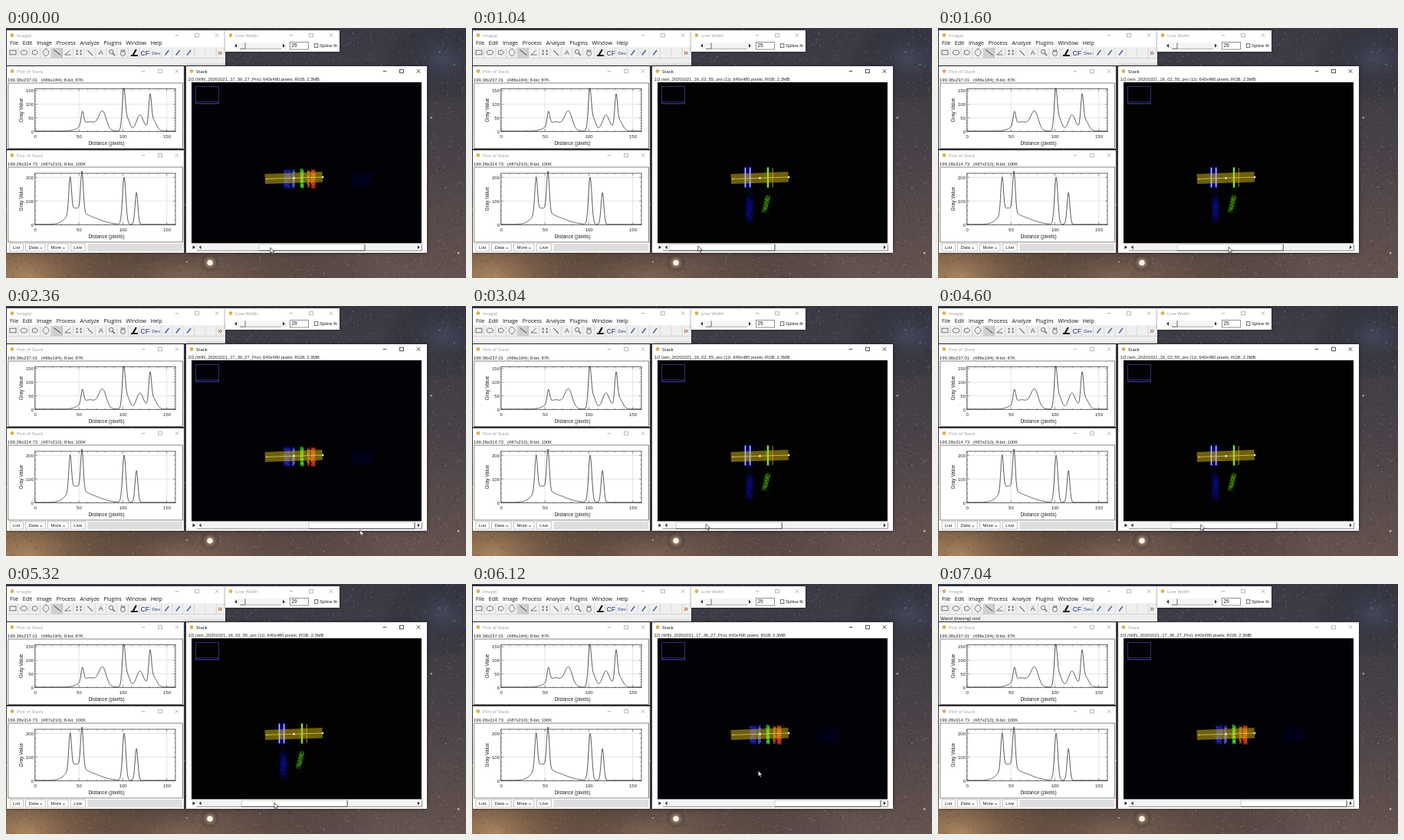
Recreate the animation shown at these times as an HTML page with a canvas. Size 600 px wide and 327 px high, loop 7.08 s.

```html
<!DOCTYPE html>
<html lang="en">
<head>
<meta charset="utf-8">
<title>Stack browsing</title>
<style>
html, body { margin: 0; width: 100%; height: 100%; overflow: hidden; background: #222; }
canvas { display: block; width: 100vw; height: 100vh; }
</style>
</head>
<body>
<canvas id="stage" width="600" height="327"></canvas>
<script>
const W = 600, H = 327, LOOP = 7080, STEP = 40;
const SANS = '"Liberation Sans", sans-serif';
const UI = '"Open Sans", sans-serif';
const MIN = 257, SPAN = 138, MAX = MIN + SPAN;   // travel of the scroll thumb
const stage = document.getElementById('stage').getContext('2d');
let g = stage;

const drag = (reach, start, end, from, to, grip) => ({ reach, start, end, from, to, grip });
// The pointer sets off at "reach", pulls from "start" to "end", held "grip" px into the thumb.
const drags = [
  drag(0, 0, 440, 330, MIN, 16),
  drag(720, 1440, 1840, MIN, MAX, 68),
  drag(2360, 2440, 2880, MAX, MIN, 40),
  drag(3000, 3000, 3600, MIN, MAX, 40),
  drag(4160, 4160, 4160, 379, 379, 39),
  drag(4280, 4280, 4800, 379, MIN, 40),
  drag(5160, 5160, 5600, MIN, MAX, 44)
];
const EXIT = [6040, 6560];

const mix = (a, b, p) => a + (b - a) * p;
const progress = (t, a, b) => t >= b ? 1 : Math.max(0, (t - a) / (b - a));
const pointerY = thumb => 288.5 + 8 * ((thumb - MIN) / SPAN) ** 2;

function pose(t) {
  const i = drags.findLastIndex(d => d.reach <= t);
  const now = drags[i], last = drags[i - 1] || now;
  const thumb = mix(now.from, now.to, progress(t, now.start, now.end));
  const reached = progress(t, now.reach, now.start);
  const leave = progress(t, ...EXIT);
  const x = mix(last.to + last.grip, thumb + now.grip, reached);
  const y = mix(pointerY(last.to), pointerY(thumb), reached);
  return { thumb, x: mix(x, 20, leave), y: mix(y, -20, leave), gone: leave === 1 };
}

function random(seed) {
  return () => {
    seed = (seed * 1664525 + 1013904223) >>> 0;
    return seed / 4294967296;
  };
}

function fill(color, x, y, w, h) {
  g.fillStyle = color;
  g.fillRect(x, y, w, h);
}

function box(color, x, y, w, h, width = .8) {
  g.strokeStyle = color;
  g.lineWidth = width;
  g.strokeRect(x, y, w, h);
}

function line(color, points, width = .8, close = false) {
  g.strokeStyle = color;
  g.lineWidth = width;
  g.beginPath();
  points.forEach(([x, y]) => g.lineTo(x, y));
  if (close) g.closePath();
  g.stroke();
}

function shape(color, points) {
  g.fillStyle = color;
  g.beginPath();
  points.forEach(([x, y]) => g.lineTo(x, y));
  g.fill();
}

function oval(color, x, y, rx, ry = rx, filled = false) {
  g.fillStyle = g.strokeStyle = color;
  g.lineWidth = .8;
  g.beginPath();
  g.ellipse(x, y, rx, ry, 0, 0, 7);
  filled ? g.fill() : g.stroke();
}

const disc = (color, x, y, r) => oval(color, x, y, r, r, true);
const arrowHead = (x, y, dx) => shape('#222', [[x, y - 2.4], [x, y + 2.4], [x + dx, y]]);

function text(str, x, y, size = 6, color = '#222', align = 'left', font = SANS) {
  g.font = size + 'px ' + font;
  g.fillStyle = color;
  g.textAlign = align;
  g.fillText(str, x, y);
  return g.measureText(str).width;
}

function glow(color, x, y, rx, ry) {
  g.save();
  g.translate(x, y);
  g.scale(rx, ry);
  const grad = g.createRadialGradient(0, 0, 0, 0, 0, 1);
  grad.addColorStop(0, color);
  grad.addColorStop(1, 'transparent');
  fill(grad, -1, -1, 2, 2);
  g.restore();
}

function sky() {
  const grad = g.createLinearGradient(0, 0, 0, H);
  grad.addColorStop(0, '#3a3a45');
  grad.addColorStop(.5, '#484147');
  grad.addColorStop(1, '#65534e');
  fill(grad, 0, 0, W, H);
  glow('rgba(196,152,108,.95)', 30, 325, 250, 130);
  glow('rgba(150,116,94,.6)', 230, 325, 260, 90);
  glow('rgba(72,84,112,.5)', 570, 40, 80, 60);
  const rnd = random(11);
  for (let i = 0; i < 5000; i++) {
    const tone = rnd() < .5 ? '15,12,18' : '210,195,190';
    fill(`rgba(${tone},${.05 + rnd() * .2})`, rnd() * W, rnd() * H, 1.5, 1.5);
  }
  for (let i = 0; i < 420; i++) {
    disc(`rgba(230,225,235,${.2 + rnd() * .6})`, rnd() * W, rnd() * H, .3 + 1.2 * rnd() ** 6);
  }
  glow('rgba(255,228,190,.9)', 266, 307, 13, 13);
  disc('#fff6e6', 266, 307, 3.6);
}

function windowBox(x, y, w, h, title, shut, { gap = 22, active = false, shadow = 3 } = {}) {
  g.save();
  g.shadowColor = 'rgba(0,0,0,.5)';
  g.shadowBlur = shadow;
  fill('#fff', x, y, w, h);
  g.restore();
  const ink = active ? '#000' : '#999';
  const cy = y + 6.5, r = 2.3, max = shut - gap, min = max - gap;
  disc('#e2b04a', x + 7, cy, 2.4);
  text(title, x + 13, y + 8.8, 6, ink, 'left', UI);
  line(ink, [[min - r, cy], [min + r, cy]], .7);
  box(ink, max - r, cy - r, 2 * r, 2 * r, .7);
  for (const s of [-r, r]) line(ink, [[shut - r, cy - s], [shut + r, cy + s]], .7);
}

function toolIcons() {
  const ink = '#555', pitch = 14.35, cy = 32;
  const at = i => 9 + i * pitch;
  for (let i = 0; i < 19; i++) {
    fill(i === 4 ? '#cfcfcf' : '#efefef', at(i) - 7, 26, 13.4, 13);
    line(i === 4 ? '#777' : '#c8c8c8', [[at(i) + 6.9, 26], [at(i) + 6.9, 39]], .7);
  }
  box(ink, at(0) - 4, cy - 2.8, 8, 5.6);
  oval(ink, at(1), cy, 4.2, 2.9);
  for (const i of [2, 3]) {
    const blob = Array.from({ length: i === 2 ? 5 : 24 }, (_, k, a = k * Math.PI * 2 / (i === 2 ? 5 : 24)) =>
      [at(i) + 4 * Math.cos(a), cy + 3.3 * Math.sin(a) * (i === 2 ? 1 : 1 - .4 * Math.cos(a * 2))]);
    line(ink, blob, .8, true);
  }
  line('#111', [[at(4) - 4, cy - 3.5], [at(4) + 5, cy + 3.5]]);
  line(ink, [[at(5) + 4, cy + 3], [at(5) - 4, cy + 3], [at(5) + 3, cy - 3]]);
  for (let k = 0; k < 4; k++) {
    const x = at(6) - 2.5 + 5 * (k % 2), y = cy - 2 + 4 * (k >> 1);
    line(ink, [[x - 1.4, y], [x + 1.4, y]]);
    line(ink, [[x, y - 1.4], [x, y + 1.4]]);
  }
  line(ink, [[at(7) - 3, cy - 3], [at(7) + 3.5, cy + 4]], 1.1);
  text('A', at(8), cy + 3.3, 9, ink, 'center');
  oval(ink, at(9) - 1, cy - 1, 2.7);
  line(ink, [[at(9) + 1, cy + 1], [at(9) + 4, cy + 4]], 1.2);
  oval(ink, at(10), cy + 1.3, 3, 3.2);
  for (let k = -1; k < 2; k++) line(ink, [[at(10) + 2 * k, cy - 1], [at(10) + 2.2 * k, cy - 4]]);
  fill('#111', at(11) - 4, cy + 3, 9, 2);
  line('#111', [[at(11) - 1, cy + 3], [at(11) + 3, cy - 4]], 2.2);
  text('CF', at(12), cy + 3.5, 8.6, '#1d2b78', 'center', 'bold ' === '' ? UI : SANS);
  text('Dev', at(13), cy + 3, 6, '#2b3a90', 'center');
  for (let i = 14; i < 17; i++) line('#4560a0', [[at(i) - 2.5, cy + 3.5], [at(i) + 2.5, cy - 3]], 1.4);
  text('»', 279, 35.5, 11, '#9c4a20', 'center');
}

function mainWindow() {
  windowBox(1, 3, 285, 46, 'ImageJ', 275, { gap: 26 });
  let x = 5;
  for (const name of 'File Edit Image Process Analyze Plugins Window Help'.split(' ')) {
    x += 5.7 + text(name, x, 22.3, 7, '#111', 'left', UI);
  }
  fill('#efefef', 1, 25, 285, 24);
  toolIcons();
  line('#c4c4c4', [[1, 39.5], [286, 39.5]], .6);
}

function widthWindow() {
  windowBox(286, 3, 149, 28, 'Line Width', 424, { gap: 26 });
  fill('#f4f4f4', 297, 19, 69, 8.5);
  arrowHead(301, 23.2, -2.8);
  arrowHead(361, 23.2, 2.8);
  line('#666', [[305, 27.2], [312, 27.2], [312, 19.5]], 1);
  line('#888', [[312, 27.2], [359, 27.2]], .7);
  box('#777', 370.5, 18.5, 24, 9.5);
  text('29', 372.5, 25.4, 6.4);
  box('#444', 402.3, 20.7, 4.6, 4.6);
  text('Spline fit', 409, 25.3);
}

// Each peak is [centre, height, width].
function spectrum(peaks) {
  return v => peaks.reduce((sum, [c, h, w]) => sum + h * Math.exp(-(((v - c) / w) ** 2) / 2), 1.5);
}

function plot(top, bottom, tick, scale, value) {
  const left = 37.8, right = 221, px = v => left + v * 1.146, py = v => bottom - v * scale;
  for (let v = 0; v <= 160; v += 10) {
    const major = v % 50 === 0, x = px(v), len = major ? 3 : 1.5;
    if (major) {
      line('#d8d8d8', [[x, top], [x, bottom]], .7);
      text(v, x + .3, bottom + 8.6, 6, '#222', 'center');
    }
    line('#555', [[x, bottom], [x, bottom - len]], .6);
    line('#555', [[x, top], [x, top + len]], .6);
  }
  for (let v = 0; py(v) >= top; v += tick / 5) {
    const major = v % tick === 0, len = major ? 3 : 1.5;
    if (major) {
      line('#d8d8d8', [[left, py(v)], [right, py(v)]], .7);
      text(v, 36, py(v) + 2.2, 6, '#222', 'right');
    }
    line('#555', [[left, py(v)], [left + len, py(v)]], .6);
    line('#555', [[right, py(v)], [right - len, py(v)]], .6);
  }
  box('#444', left, top, right - left, bottom - top);
  const curve = Array.from({ length: 320 }, (_, k) => [px(k / 2), py(value(k / 2))]);
  line('#333', curve, .8);
  text('Distance (pixels)', 131, bottom + 17.4, 6.4, '#222', 'center');
  g.save();
  g.translate(21.5, (top + bottom) / 2);
  g.rotate(-Math.PI / 2);
  text('Gray Value', 0, 0, 6.4, '#222', 'center');
  g.restore();
}

function plotWindow(y, h, info, paneHeight) {
  windowBox(1, y, 231, h, 'Plot of Stack', 223);
  text(info, 2, y + 20.2, 5.9);
  box('#666', 2.8, y + 22, 227.6, paneHeight);
}

function plotWindows() {
  plotWindow(50, 108, '199.38x237.01   (486x184); 8-bit; 87K', 85.5);
  plot(79.5, 135.3, 50, .355, spectrum([
    [62, 34, 9], [54, 50, 1.5], [77, 66, 4.2], [101, 140, 1.7],
    [105, 45, 3], [119.5, 59, 4], [131, 105, 1.5], [134, 42, 4]
  ]));
  plotWindow(160, 134, '199.28x314.73   (487x210); 8-bit; 100K', 98);
  plot(190, 257.3, 100, .31, spectrum([
    [40, 148, 1.5], [45, 50, 8], [53.5, 168, 1.5], [60, 32, 14], [101.5, 198, 1.9], [115.5, 134, 1.6]
  ]));
  fill('#fff', 2, 281, 229, 12);
  let x = 5;
  for (const name of ['List', 'Data »', 'More »', 'Live']) {
    const w = text(name, x + 4, 289.3) + 8;
    box('#b4b4b4', x, 282, w, 10);
    x += w + 3.2;
  }
  fill('#dedede', x, 282, 230 - x, 10.5);
}

// A grainy vertical band that may lean to one side towards its foot.
function band(rgb, x, y, w, h, alpha, lean = 0) {
  const rnd = random(x * 7 + y);
  for (let i = 0; i < w * h * 1.6; i++) {
    const u = rnd(), v = rnd();
    const edge = Math.min(1, 5 * Math.min(v, 1 - v) + .3);
    fill(`rgba(${rgb},${alpha * edge * rnd()})`, x + u * (w - 1) + lean * v, y + v * (h - 1), 1.2, 1.2);
  }
}

function brightLine(core, halo, x, w = 2.6) {
  fill(halo, x - w / 2, 182, w, 27);
  fill(core, x - .6, 183, 1.2, 25);
}

function emissionLines() {
  glow('rgba(30,30,255,.6)', 360, 196, 12, 24);
  glow('rgba(40,130,10,.4)', 387, 196, 9, 22);
  brightLine('#c4c4ff', '#2c2cf0', 356.5);
  brightLine('#c4c4ff', '#2c2cf0', 362.7);
  brightLine('#c8f080', '#3ca018', 386);
  brightLine('#a8641c', 'transparent', 392.3);
  glow('rgba(16,18,190,.55)', 362, 236, 9, 32);
  band('40,40,210', 357, 219, 10, 36, .22);
  glow('rgba(30,100,10,.4)', 384, 230, 8, 22);
  band('90,180,20', 383, 218, 7, 24, .5, -6);
}

function broadBands() {
  glow('rgba(20,20,200,.55)', 369, 197, 14, 22);
  glow('rgba(20,120,20,.4)', 386, 197, 8, 20);
  glow('rgba(170,40,10,.45)', 399, 197, 11, 20);
  band('50,60,255', 362, 184, 9, 26, .6);
  band('90,110,255', 373, 184, 4, 26, .8);
  band('70,240,60', 383.5, 183, 5, 27, 1);
  band('210,120,30', 392.5, 184, 4, 25, .75);
  band('255,70,30', 397.5, 184, 6, 26, .95);
  band('20,20,120', 451, 187, 28, 22, .2);
}

function selection() {
  shape('rgba(215,190,15,.5)', [[337.5, 191], [412.5, 188], [413, 201.5], [338, 204]]);
  line('#d8c860', [[340, 197.4], [413, 195]], .8);
  fill('#f5e04a', 339.3, 196.7, 1.5, 1.5);
  fill('#fff', 374.4, 195.2, 2.2, 2.2);
  fill('#fff', 412, 194, 2.2, 2.2);
  box('#3c3896', 247.5, 76.5, 30, 22.5);
  box('#403cae', 248, 96.5, 29, 2, .6);
}

function canvasView(second) {
  fill(second ? '#020206' : '#020203', 242, 71, 300, 210.5);
  second ? broadBands() : emissionLines();
  selection();
}

function stackWindow(active) {
  windowBox(235, 50, 314, 244, 'Stack', 538, { active, shadow: active ? 5 : 2 });
  fill('#f2f2f2', 248, 282.5, 295, 9);
  arrowHead(243.5, 286.8, 3.5);
  arrowHead(254.5, 286.8, -2.6);
  arrowHead(537, 286.8, 2.6);
  line('#777', [[249, 291.3], [542.5, 291.3], [542.5, 283]], .8);
}

function scrollThumb(x) {
  const right = x + SPAN;
  fill('#fff', x, 282.7, SPAN, 8.4);
  line('#bbb', [[x, 291], [x, 283], [right, 283]], .7);
  line('#4a4a4a', [[x, 291.2], [right, 291.2], [right, 283]], 1);
}

function cursor(x, y) {
  const arrow = [[0, 0], [0, 7.3], [1.7, 5.8], [2.9, 8.4], [4, 7.9], [2.9, 5.4], [5.2, 5.2]]
    .map(([dx, dy]) => [x - 1.2 + dx, y - 3.5 + dy]);
  shape('#fff', arrow);
  line('#222', arrow, .7, true);
}

function layer(paint) {
  const c = document.createElement('canvas');
  c.width = W;
  c.height = H;
  g = c.getContext('2d');
  paint();
  g = stage;
  return c;
}

const desktop = layer(() => {
  sky();
  mainWindow();
  widthWindow();
  plotWindows();
});
const frontWindow = [false, true].map(on => layer(() => stackWindow(on)));
const slices = [false, true].map(second => layer(() => canvasView(second)));
const labels = ['1/2 (win_20201021_16_02_55_pro (1))', '2/2 (WIN_20201021_17_36_27_Pro)'];

function draw(t) {
  const { thumb, x, y, gone } = pose(t);
  const slice = thumb >= MIN + SPAN / 2 ? 1 : 0;
  g.drawImage(desktop, 0, 0);
  if (t >= 6400) text('Wand (tracing) tool', 3, 46.6, 6.2);
  g.drawImage(frontWindow[t < 7000 ? 1 : 0], 0, 0);
  text(labels[slice] + '; 640x480 pixels; RGB; 2.3MB', 237.5, 68.8, 5.75);
  g.drawImage(slices[slice], 0, 0);
  scrollThumb(thumb);
  if (!gone) cursor(x, y);
}

const start = performance.now();
function tick() {
  const t = (performance.now() - start) % LOOP;
  draw(Math.floor(t / STEP) * STEP);
  requestAnimationFrame(tick);
}
tick();
</script>
</body>
</html>
```
